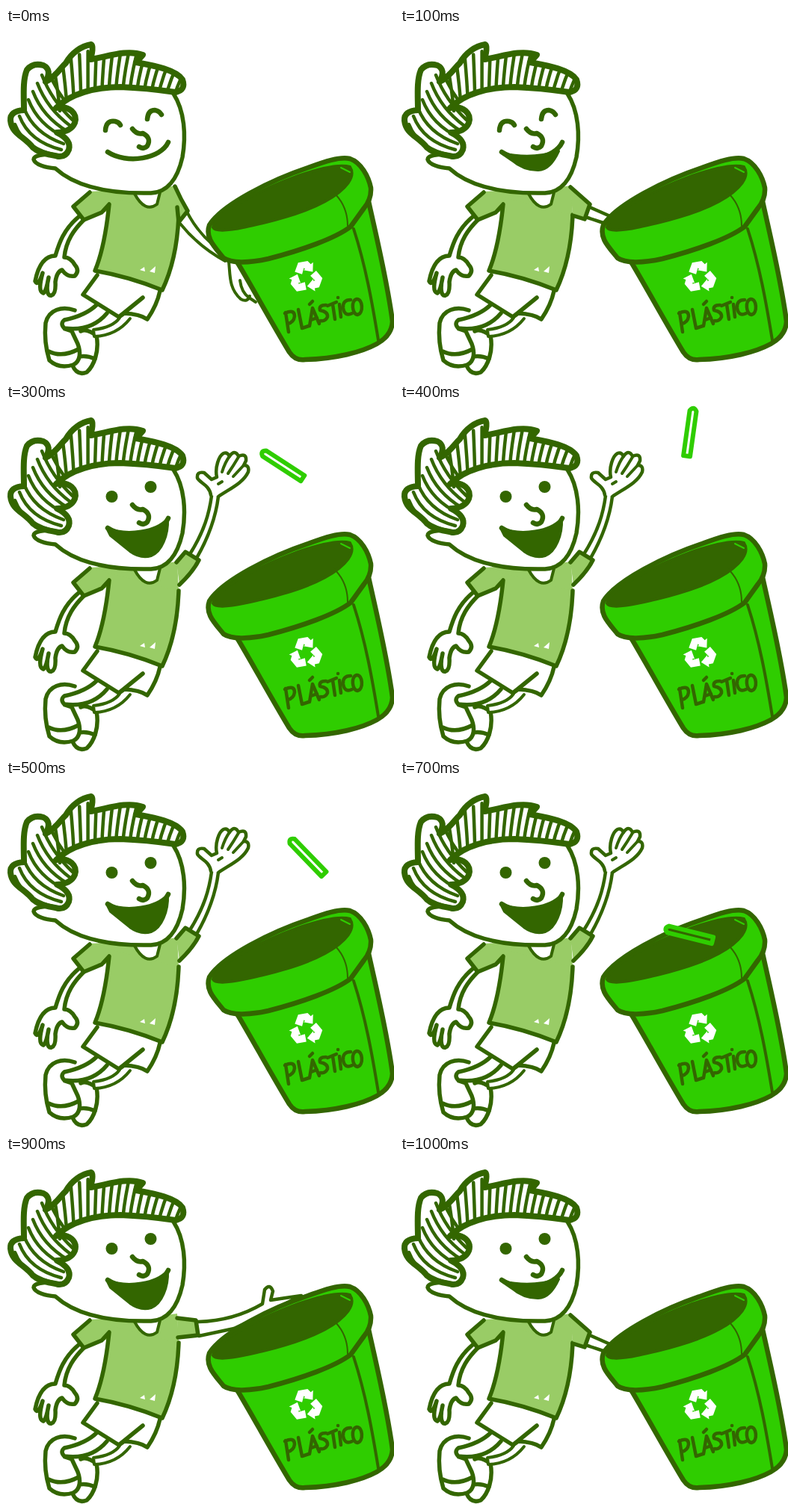
These frames come from a looping animation (519 px wide and 466 px high, 1.1 s). An HTML page:

```html
<!DOCTYPE html>
<html lang="pt">
<meta charset="utf-8">
<title>Plástico</title>
<style>
  html, body { margin: 0; height: 100%; overflow: hidden; background: #fff }
  svg { display: block; width: 519px; height: 466px; fill: none; stroke: #360; stroke-width: 5.5; stroke-linecap: round; stroke-linejoin: round }
  .white { fill: #fff }
  .shirt { fill: #9c6 }
  .bin { fill: #2fcd00; stroke-width: 6.5 }
  .dark { fill: #360 }
  .thin { stroke-width: 4 }
  .bold { stroke-width: 6.5 }
</style>
<svg viewBox="0 0 519 466">
  <defs>
    <path id="hair" d="M53 72C67 65 74 52 80 47C88 33 101 24 114 22Q118 24 113 42C134 39 161 28 183 36L174 46C195 50 226 55 236 69Q241 83 227 86C206 83 180 80 153 79C119 79 86 88 67 107C85 103 96 115 92 127Q87 139 68 140Q88 150 84 163Q80 173 70 172C58 169 46 169 36 160C24 145 8 142 6 124Q5 111 24 110C24 92 22 70 28 56Q36 46 50 50Q62 56 53 72Z"/>
    <clipPath id="hairClip"><use href="#hair"/></clipPath>
    <g id="hand" class="white">
      <path d="M274 122C272 108 259 106 256 99Q255 90 265 92L275 101L282 98C279 85 285 69 291 66Q296 64 299 70Q306 60 311 70Q322 65 321 76L318 82Q326 82 324 91C317 106 300 113 284 124"/>
      <path class="thin" d="M289 91Q293 78 299 70M297 93Q304 83 311 71M304 97L318 82M284 107L289 104"/>
    </g>
    <path id="arrow" d="M-10.5 -8L-5.3 -17H5L7.700 -13L10.500 -14.500L8.400 -4.600L-1 -8L.8 -9L-.3 -10.500L-3.300 -4Z"/>
  </defs>

  <!-- legs and shoes -->
  <path class="white" d="M100 406Q108 402 121 412C125 432 118 452 108 461Q95 466 89 452L92 430"/>
  <path d="M94 441Q106 437 119 443"/>
  <path class="white thin" d="M166 389Q148 412 118 413L117 404Q143 401 152 388"/>
  <path class="white" d="M92 378C75 372 57 377 53 395C51 415 54 432 58 445Q71 457 90 451C100 446 100 434 96 423L88 406L79 403"/>
  <path d="M57 433Q75 442 97 430"/>
  <path class="white" d="M122 370Q107 385 78 391Q72 396 78 402Q114 407 135 382"/>
  <path class="white" d="M122 331L103 357L151 387L158 382Q179 383 189 390Q202 371 206 352"/>
  <path d="M151 387L183 361"/>

  <!-- left arm -->
  <path class="white" d="M97 253C77 270 71 288 66 305C48 305 42 324 39 339Q43 347 49 328C46 339 43 353 50 355Q54 352 57 334C54 346 54 360 61 358Q67 356 66 340Q68 326 75 324Q82 334 92 332Q99 325 92 317Q86 307 78 307C80 285 91 270 104 257"/>

  <!-- right arms, behind sleeve and bin -->
  <g stroke-width="4.5">
    <g data-on="0" class="thin">
      <path d="M243 248Q263 286 303 309M233 262Q258 293 293 312"/>
      <path d="M298 313C300 331 298 349 314 363Q323 368 326 359M313 338Q315 354 325 361L334 367"/>
    </g>
    <path data-on="1 10" d="M254 240L281 252M248 253L275 262"/>
    <path data-on="2 9" class="white" d="M257 222C293 221 321 211 343 198L346 179Q353 170 357 181L354 193L374 190L395 187L345 212L305 231L258 241"/>
    <g data-on="3 4 5 6 7">
      <path class="white" d="M244 204C266 170 272 145 275 123M254 208Q279 165 284 124"/>
      <use href="#hand"/>
    </g>
    <g data-on="8">
      <path class="white" d="M243 214Q289 181 300 150M254 220Q291 190 307 154"/>
      <use href="#hand" transform="translate(302 150) rotate(20) translate(-278 -123)"/>
    </g>
  </g>

  <!-- shirt -->
  <path class="shirt" stroke="none" d="M112 219L89 240L104 258L134 246Q132 296 118 325Q162 335 210 351Q233 290 231 250L229 211L205 214Z"/>
  <path class="shirt" d="M112 220L90 239L104 257L128 247L138 236Q132 294 119 325Q165 333 209 351Q229 309 231 250"/>
  <path class="white thin" d="M172 222Q186 248 202 236L206 220"/>
  <path fill="#fff" stroke="none" d="M179 324L185 320L186 326ZM192 326L200 319L199 328Z"/>
  <g class="shirt">
    <path data-on="0" d="M226 212Q234 230 243 245L231 260L229 240"/>
    <path data-on="1 10" d="M228 213L254 236L247 256L231 251"/>
    <path data-on="2 9" d="M229 217L254 220L257 240L230 243"/>
    <path data-on="3 4 5 6 7" d="M228 212L240 198L258 209Q250 225 232 242"/>
    <path data-on="8" d="M229 217L242 206L254 226L231 241"/>
  </g>

  <!-- head -->
  <path class="white" d="M224 88C239 111 241 144 236 173C229 204 215 220 194 221C151 222 98 217 66 188C53 187 39 183 37 176Q37 168 72 169"/>
  <use href="#hair" class="white" stroke="none"/>
  <path id="strands" stroke-width="4.5" clip-path="url(#hairClip)"/>
  <use href="#hair" stroke-width="8"/>
  <path class="bold" d="M169 135Q175 143 183 141Q195 147 189 158Q184 163 178 159"/>
  <g class="bold">
    <path data-on="0 1" d="M133 137Q134 123 146 125Q151 126 153 130M189 122Q190 110 199 110Q205 111 208 116"/>
    <path data-on="2" d="M128 128Q126 112 139 111Q146 112 149 119M177 118Q178 105 188 104Q196 104 199 109"/>
    <g data-on="3 4 5 6 7 8 9 10" class="dark" stroke="none">
      <circle cx="141.500" cy="124" r="8"/><circle cx="193.500" cy="111" r="8"/>
    </g>
    <path d="M136 166C162 183 207 175 217 153"/>
  </g>
  <g class="dark" stroke-width="4">
    <path data-on="1 10" d="M137 168Q176 177 212 165Q200 191 184 190Q165 190 150 177Z"/>
    <path data-on="2" d="M135 166C163 178 202 170 216 154C214 174 203 196 187 198Q174 197 140 175Z"/>
    <path data-on="3 4 5 6 7 8 9" d="M135 166C163 178 202 170 216 154C217 175 208 198 194 203Q180 207 166 197L140 176Z"/>
  </g>

  <!-- bin -->
  <path class="bin" d="M309 313C331 350 356 396 379 434Q387 446 400 444C441 443 476 434 496 423Q516 412 517 393C510 339 496 282 485 232L440 250Z"/>
  <path class="thin" d="M465 269C481 318 490 369 498 418"/>
  <path class="bin" d="M272 264C289 236 356 203 404 187C426 179 446 172 460 175C475 180 485 199 488 214Q489 229 479 241L461 266C440 282 394 298 351 309C324 315 301 315 291 308C279 293 266 281 272 264Z"/>
  <path class="dark thin" d="M277 267C282 245 342 216 391 198C420 188 446 182 460 186Q466 195 458 207C439 233 390 250 344 261C319 267 281 276 277 267Z"/>
  <path d="M448 187L460 193" stroke="#2fcd00" stroke-width="2"/>
  <path d="M438 220Q457 238 457 265" stroke-width="2"/>
  <g fill="#fff" stroke="none" transform="translate(401 334) rotate(-10) scale(1.25)">
    <use href="#arrow"/>
    <use href="#arrow" transform="rotate(120)"/>
    <use href="#arrow" transform="rotate(240)"/>
  </g>
  <path role="img" aria-label="PLÁSTICO" stroke-width="4.5" d="M374 381L378 407M373 382Q386 376 386 386Q385 394 377 396M391 377L396 402L405 399M406 399L410 375L419 396M408 391L416 388M406 370L410 366M428 371Q418 371 420 378Q431 380 430 387Q427 393 421 392M430 372L442 367M437 370L440 390M446 370L448 387M444 361h.1M461 364Q450 364 451 375Q453 387 463 382M469 363C461 365 463 383 470 384C479 382 477 362 469 363Z"/>

  <!-- thrown stick -->
  <g stroke="#2fcd00" stroke-width="6">
    <path id="stick" d="M32 -4.500H-29Q-36 0 -29 4.500H32Z"/>
    <path data-on="8" d="M372 249L352 240Q351 236 359 237L394 245"/>
  </g>
</svg>
<script>
  const STEP = 100, STEPS = 11;
  const $ = id => document.getElementById(id);

  // stick centre and angle at each step while it is in the air
  const flight = {
    2: [342, 153, -32], 3: [370, 82, 33], 4: [388, 38, 98],
    5: [403, 103, 46], 6: [397, 158, 28], 7: [387, 207, 14]
  };

  let strands = '';
  for (let i = 0; i < 17; i++) {
    const x = 72 + 9.4 * i, y = 80 + .0045 * (x - 155) ** 2;
    strands += `M${x} ${y}q${-2 + i / 2} -25 ${-8 + 2 * i} -58`;
  }
  for (let i = 0; i < 8; i++) {
    const x = 54 - 6 * i, y = 52 + 11 * i;
    strands += `M${x} ${y}Q${x + 13} ${y + 34} ${92 - 3 * i} ${115 + 8 * i}`;
  }
  $('strands').setAttribute('d', strands);

  const parts = [...document.querySelectorAll('[data-on]')]
    .map(el => [el, el.dataset.on.split(' ').map(Number)]);

  function draw() {
    const step = Math.floor(performance.now() / STEP) % STEPS;
    for (const [el, steps] of parts) el.style.display = steps.includes(step) ? '' : 'none';
    const pose = flight[step], stick = $('stick');
    stick.style.display = pose ? '' : 'none';
    if (pose) {
      const [x, y, angle] = pose;
      stick.setAttribute('transform', `translate(${x} ${y}) rotate(${angle})`);
      stick.setAttribute('fill', step === 7 ? '#360' : '#fff');
    }
    requestAnimationFrame(draw);
  }
  draw();
</script>
</html>
```
